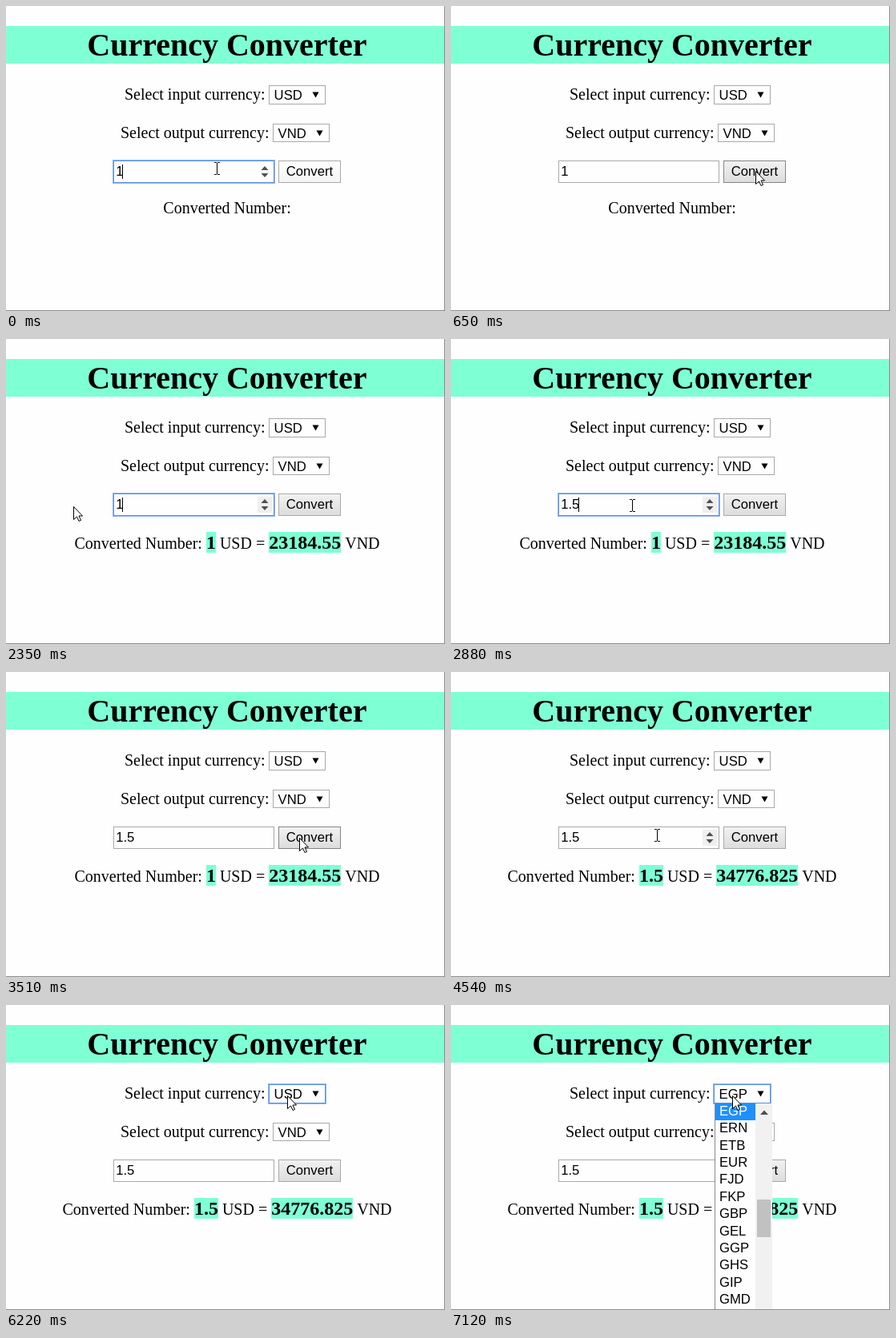
An HTML page with a canvas that plays this animation: 548 px wide and 381 px high, repeating every 8000 ms.

```html
<!DOCTYPE html>
<html lang="en">
<head>
<meta charset="utf-8">
<title>Currency Converter</title>
<style>
html, body { margin: 0; width: 100%; height: 100%; overflow: hidden; background: #fefefe; }
canvas { display: block; }
</style>
</head>
<body>
<canvas id="stage" width="548" height="381"></canvas>
<script>
const ctx = document.getElementById('stage').getContext('2d');
const LOOP = 8000, STEP = 130, BLINK = 500, RATE = 23184.55;
const SERIF = '"Liberation Serif", "Times New Roman", serif';
const SANS = '"Liberation Sans", Arial, sans-serif';
const UI = `16.67px ${SANS}`, BODY = `20px ${SERIF}`, BOLD = `bold 24px ${SERIF}`;
const PAPER = '#fefefe', LINE = '#8c8c8c', BORDER = '#a9a9a9', AQUA = '#7fffd4';

const box = (x, y, w, h) => ({ x, y, w, h });
const INPUT = box(134, 193, 201, 28);
const BUTTON = box(340, 193, 78, 28);
const SELECT_IN = box(328, 99, 71, 24);
const SELECT_OUT = box(333, 147, 71, 23);

// Pointer glides, sampled every STEP ms
const HOME = { x: 263, y: 203 };
const glide = (start, steps, x, y) => ({ start, steps, x, y });
const GLIDES = [
  glide(0, 5, 380, 206),
  glide(1040, 4, 249, 206),
  glide(1580, 2, 89, 219),
  glide(2220, 1, 84, 209),
  glide(2480, 2, 107, 207),
  glide(2750, 1, 226, 208),
  glide(2880, 5, 382, 207),
  glide(3890, 1, 380, 204),
  glide(4150, 3, 257, 204),
  glide(4540, 2, 86, 209),
  glide(5320, 4, 342, 94),
  glide(5840, 2, 351, 113)
];

// Changes of the form; each one adds to the state before it
const EVENTS = [
  [0, { value: '1', currency: 'USD', focus: 'input', pale: true }],
  [650, { focus: '', pale: false }],
  [1040, { amount: 1 }],
  [1710, { focus: 'input', drag: true }],
  [1840, { selected: true }],
  [2350, { selected: false, drag: false }],
  [2620, { value: '1.' }],
  [2740, { value: '1.5' }],
  [3510, { focus: '' }],
  [4020, { amount: 1.5 }],
  [4680, { focus: 'input', drag: true }],
  [4800, { selected: true }],
  [5450, { drag: false }],
  [6220, { focus: 'select', selected: false }],
  [6340, { list: 'SHP SLL SOS SRD STD SVC SYP SZL THB TJS TMT TND' }],
  [7120, { currency: 'EGP', list: 'EGP ERN ETB EUR FJD FKP GBP GEL GGP GHS GIP GMD' }]
];

function stateAt(t) {
  const state = {};
  for (const [at, change] of EVENTS) {
    if (at <= t) Object.assign(state, change, { since: at });
  }
  state.caret = state.focus === 'input' && !state.selected && (t - state.since) % (2 * BLINK) < BLINK;
  return state;
}

function pointerAt(t) {
  let { x, y } = HOME;
  for (const g of GLIDES) {
    if (t < g.start) break;
    const p = Math.min(1, Math.floor((t - g.start) / STEP) / g.steps);
    const ease = p * p * (3 - 2 * p);
    x += (g.x - x) * ease;
    y += (g.y - y) * ease;
  }
  return { x: Math.round(x), y: Math.round(y) };
}

function rect(x, y, w, h, color) {
  ctx.fillStyle = color;
  ctx.fillRect(x, y, w, h);
}

function outline(x, y, w, h, color) {
  ctx.lineWidth = 1;
  ctx.strokeStyle = color;
  ctx.strokeRect(x + .5, y + .5, w - 1, h - 1);
}

function text(str, x, y, font, color = '#000') {
  ctx.font = font;
  ctx.fillStyle = color;
  ctx.fillText(str, x, y);
}

function widthOf(str, font) {
  ctx.font = font;
  return ctx.measureText(str).width;
}

function poly(points, fill, stroke) {
  ctx.beginPath();
  points.forEach(([x, y]) => ctx.lineTo(x, y));
  ctx.closePath();
  ctx.fillStyle = fill;
  ctx.fill();
  if (!stroke) return;
  ctx.lineWidth = 1;
  ctx.strokeStyle = stroke;
  ctx.stroke();
}

function triangle(x, y, w, h, color) {
  poly([[x - w / 2, y], [x + w / 2, y], [x, y + h]], color);
}

function field({ x, y, w, h }, { fill = PAPER, border = BORDER, focused = false } = {}) {
  rect(x, y, w, h, fill);
  outline(x, y, w, h, focused ? '#5a90e0' : border);
  if (focused) outline(x - 1, y - 1, w + 2, h + 2, '#8fb5f2');
}

const inside = (b, p) => p.x >= b.x && p.x < b.x + b.w && p.y >= b.y && p.y < b.y + b.h;

function drawSelect(label, labelX, b, value, focused) {
  const baseline = b.y + 17.5 | 0;
  text(label, labelX, baseline + 1, BODY);
  field(b, { focused });
  text(value, b.x + 6.6, baseline + 1, UI);
  triangle(b.x + 58.5, b.y + 8.5, 8, 7, '#000');
}

function drawInput(s, hover) {
  const focused = s.focus === 'input', x = 137.2;
  const end = x + widthOf(s.value, UI);
  field(INPUT, { focused });
  if (s.selected) rect(x, 197, end - x, 19, '#3390ff');
  text(s.value, x, 212, UI, s.selected ? '#fff' : '#000');
  if (s.caret) rect(Math.floor(end) - 1, 198, 1, 18, '#000');
  if (!focused && !hover) return;
  rect(314, 197, 18, 20, s.pale ? PAPER : '#efefef');
  triangle(323, 205, 9, -5, '#505050');
  triangle(323, 209, 9, 5, '#505050');
}

function drawButton(s, hover) {
  const fill = ctx.createLinearGradient(0, BUTTON.y, 0, BUTTON.y + BUTTON.h);
  fill.addColorStop(0, s.pale ? PAPER : '#f2f2f2');
  fill.addColorStop(1, s.pale ? '#f4f4f4' : '#dcdcdc');
  field(BUTTON, { fill, border: hover ? '#858585' : BORDER });
  text('Convert', 349.8, 212, UI);
}

function drawResult(amount) {
  const label = 'Converted Number:';
  const parts = [[label, BODY]];
  if (amount) {
    const total = +(amount * RATE).toFixed(3);
    parts.push([' ', BODY], [`${amount}`, BOLD], [' USD = ', BODY], [`${total}`, BOLD], [' VND', BODY]);
  }
  const widths = parts.map(([str, font]) => widthOf(str, font));
  let x = 276 - widths.reduce((sum, w) => sum + w) / 2;
  parts.forEach(([str, font], i) => {
    if (font === BOLD) rect(Math.round(x), 241, Math.round(widths[i]), 26, AQUA);
    text(str, x, amount ? 262 : 259, font);
    x += widths[i];
  });
}

function drawList(s) {
  rect(329, 123, 72, 257, PAPER);
  rect(329, 123, 1, 257, LINE);
  rect(380, 123, 21, 257, '#f1f1f1');
  triangle(391, 137, 10, -5.5, '#505050');
  s.list.split(' ').forEach((code, i) => {
    const y = 123 + i * 21.36, picked = code === s.currency;
    if (picked) {
      rect(330, y, 50, 21, '#1e90ff');
      rect(382, 243, 17, 47, '#c1c1c1');
    }
    text(code, 335, Math.round(y + 15), UI, picked ? '#fff' : '#000');
  });
}

function drawBeam({ x, y }) {
  rect(x, y - 7, 1, 14, '#000');
  for (const dy of [-8, 7]) {
    rect(x - 3, y + dy, 3, 1, '#000');
    rect(x + 1, y + dy, 3, 1, '#000');
  }
}

function drawArrow({ x, y }) {
  const shape = [[0, 0], [0, 16], [4, 12.5], [6.5, 18], [9, 17], [6.5, 11.5], [11, 11.5]];
  poly(shape.map(([dx, dy]) => [x + dx + .5, y + dy + .5]), '#fff', '#000');
}

function draw(t) {
  const s = stateAt(t), pointer = pointerAt(t);
  const overInput = inside(INPUT, pointer);

  rect(0, 0, 548, 381, PAPER);
  rect(0, 25, 547, 47, AQUA);
  text('Currency Converter', 101.3, 62, `bold 40px ${SERIF}`);
  drawSelect('Select input currency:', 148, SELECT_IN, s.currency, s.focus === 'select');
  drawSelect('Select output currency:', 143, SELECT_OUT, 'VND', false);
  drawInput(s, overInput);
  drawButton(s, inside(BUTTON, pointer));
  drawResult(s.amount);
  if (s.list) drawList(s);
  rect(547, 0, 1, 381, LINE);
  rect(0, 380, 548, 1, LINE);
  (overInput || s.drag ? drawBeam : drawArrow)(pointer);
}

const start = performance.now();
function tick() {
  draw((performance.now() - start) % LOOP);
  requestAnimationFrame(tick);
}
tick();
</script>
</body>
</html>
```
